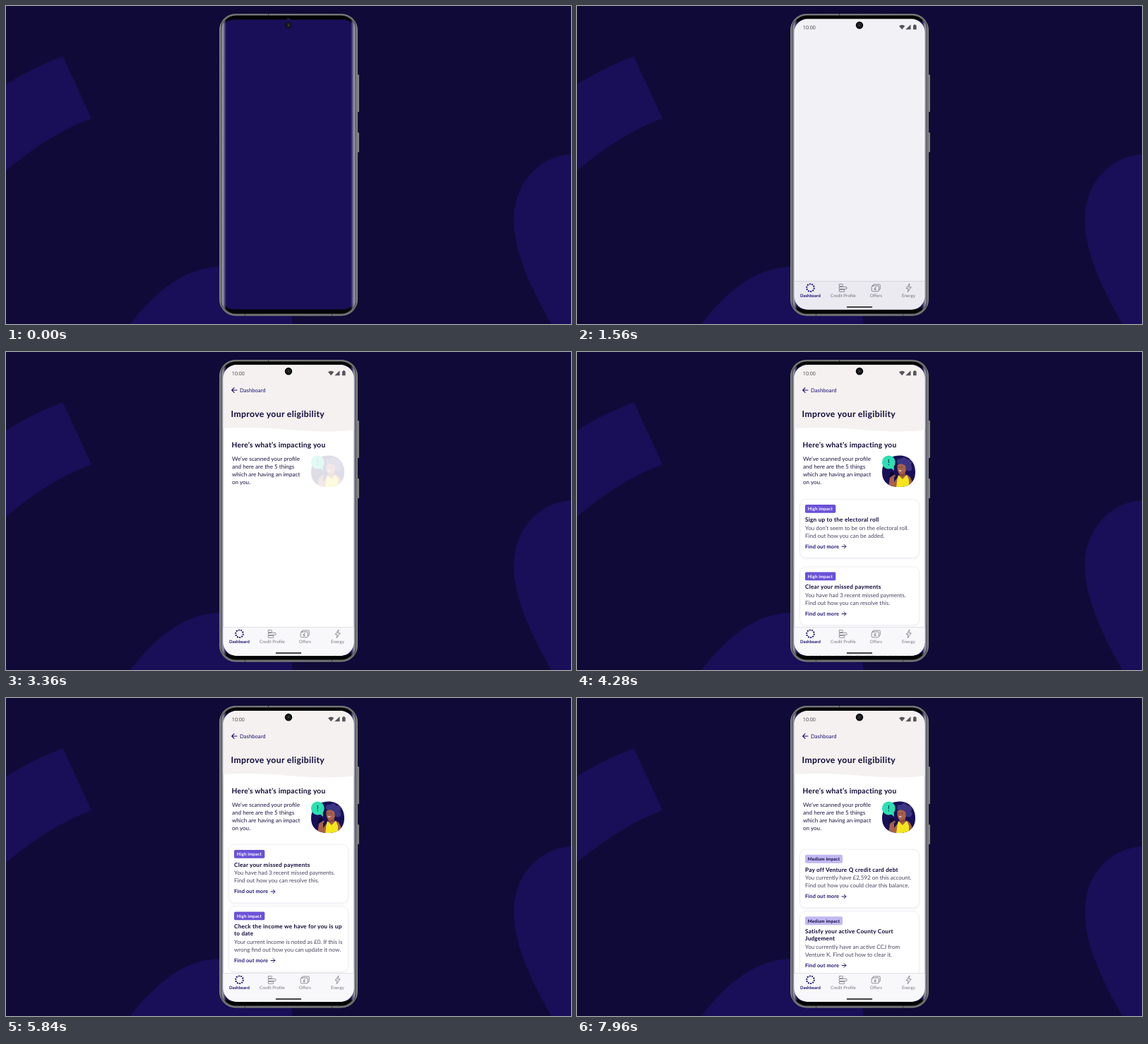
These frames come from a looping animation (800 by 450 pixels, 8 s). An HTML page:

```html
<!DOCTYPE html>
<html lang="en">
<head>
<meta charset="utf-8">
<title>Eligibility cards</title>
<style>
  html, body { margin: 0; width: 100%; height: 100%; overflow: hidden; background: #100a38; }
  svg { display: block; width: 800px; height: 450px; }
  text { font-family: Lato, "Open Sans", sans-serif; text-rendering: geometricPrecision; white-space: pre; }
  .clock { font: 7.3px Roboto, sans-serif; fill: #55555c; }
  .back { font-size: 7.7px; fill: #1c1272; }
  .h1 { font-size: 12.2px; font-weight: 700; letter-spacing: .36px; fill: #0f0938; }
  .h2 { font-size: 10.2px; font-weight: 700; letter-spacing: .25px; fill: #0f0938; }
  .para { font-size: 8.1px; fill: #1c1742; }
  .title { font-size: 8.2px; font-weight: 700; letter-spacing: .23px; fill: #0f0938; }
  .body { font-size: 8.05px; fill: #4a4763; }
  .tag { font-size: 6.3px; font-weight: 700; letter-spacing: .12px; }
  .more { font-size: 7.4px; font-weight: 700; letter-spacing: .15px; fill: #1c1272; }
  .tab { font-size: 6.2px; fill: #77767f; text-anchor: middle; }
  .tab.on { font-size: 6px; font-weight: 700; fill: #1c1272; }
  .line { fill: none; stroke-linecap: round; stroke-linejoin: round; }
  .card { fill: #fff; stroke: #ecebf1; stroke-width: .8; filter: drop-shadow(0 1px 1.5px rgba(20, 12, 70, .07)); }
</style>
</head>
<body>
<svg viewBox="0 0 800 450">
  <defs>
    <linearGradient id="metal" x1="302" x2="498" gradientUnits="userSpaceOnUse">
      <stop offset="0" stop-color="#5c5e5c"/>
      <stop offset=".007" stop-color="#8b8d8b"/>
      <stop offset=".015" stop-color="#434543"/>
      <stop offset=".03" stop-color="#646664"/>
      <stop offset=".5" stop-color="#6c6e6c"/>
      <stop offset=".97" stop-color="#646664"/>
      <stop offset=".985" stop-color="#434543"/>
      <stop offset=".993" stop-color="#8b8d8b"/>
      <stop offset="1" stop-color="#5c5e5c"/>
    </linearGradient>
    <linearGradient id="shine">
      <stop offset="0" stop-color="#4c4d52"/>
      <stop offset=".35" stop-color="#9c9bad"/>
      <stop offset=".6" stop-color="#6d6893" stop-opacity=".75"/>
      <stop offset="1" stop-color="#180f58" stop-opacity="0"/>
    </linearGradient>
    <clipPath id="screen"><rect x="307.5" y="18.2" width="185" height="411.6" rx="19"/></clipPath>
    <clipPath id="glass"><rect x="304.5" y="13.5" width="191" height="422" rx="21"/></clipPath>
    <clipPath id="blob"><path d="M432 170C432 154 443 147 456 146.500C470 146 479 156 479 170C479 184 470 191 456 191C441 191 432 184 432 170Z"/></clipPath>
  </defs>

  <rect width="800" height="450" fill="#100a38"/>
  <g fill="#180f58">
    <path d="M0 111Q40 86 80.500 71L121 159Q60 182 0 233Z"/>
    <path d="M176 450C215 400 255 370 303 369C362 367 403 408 406 450Z"/>
    <path d="M800 210C758 212 719 248 719 302C719 350 745 402 772 450H800Z"/>
  </g>

  <g fill="#7f827f">
    <rect x="497" y="97" width="3" height="53" rx="1"/>
    <rect x="497" y="179" width="3" height="28" rx="1"/>
  </g>
  <rect x="302" y="11" width="196" height="427.500" rx="23" fill="url(#metal)"/>
  <rect x="302.800" y="11.800" width="194.400" height="425.900" rx="22.200" fill="none" stroke="#868986" stroke-width=".8"/>
  <path d="M371.500 11v2.500M338.500 435.500v2.500M461.500 435.500v2.500" stroke="#3b3d3b"/>
  <rect x="305" y="13.500" width="190" height="422" rx="20.500" fill="#030304"/>
  <g clip-path="url(#glass)">
    <rect x="307.500" y="19.300" width="185" height="410" rx="14" fill="#180f58"/>
    <rect x="304" y="20" width="9" height="409" rx="4" fill="url(#shine)"/>
    <rect x="304" y="20" width="9" height="409" rx="4" fill="url(#shine)" transform="matrix(-1 0 0 1 800 0)"/>
  </g>

  <g clip-path="url(#screen)">
    <circle id="badge" cx="400" r="18.500" fill="#fff"/>
    <g id="app">
      <rect x="307" y="18" width="186" height="413" fill="#fff"/>
      <path id="header" d="M307 18H493V110C470 113.500 436 113 402 110S342 106 307 108Z" fill="#f5f1f0"/>
      <text class="clock" x="319.800" y="32.500">10:00</text>
      <g fill="#55555c">
        <path d="M456 28.300Q460.200 25 464.400 28.300L460.200 33.300Z"/>
        <path d="M465.300 33.200L472.500 26.300V33.200Z"/>
        <path d="M476 27.200H477.200V26.300H479.400V27.200H480.600V33.300H476Z"/>
      </g>
      <g id="back">
        <path class="line" d="M327 54H319.800M323 50.700L319.700 54L323 57.300" stroke="#1c1272" stroke-width="1.1"/>
        <text class="back" x="331" y="56.700">Dashboard</text>
      </g>
      <text id="h1" class="h1" x="318.600" y="92.200">Improve your eligibility</text>
      <text id="h2" class="h2" x="319.600" y="135">Here’s what’s impacting you</text>
      <g id="para"></g>
      <g id="art">
        <g clip-path="url(#blob)">
          <rect x="430" y="145" width="50" height="48" fill="#180f58"/>
          <g fill="#3a3482">
            <circle cx="457" cy="155" r="4"/><circle cx="463" cy="153.500" r="4.500"/>
            <circle cx="469" cy="157" r="5"/><circle cx="470" cy="164" r="4.500"/><circle cx="464" cy="159" r="6"/>
          </g>
          <path d="M441 192L443 178L449 177L449 184L456 175L467 174Q475 176 475 192Z" fill="#a86149"/>
          <path d="M452 192L453.500 180L455 174L461 180L467 173.500L470 181V192Z" fill="#f4e51c"/>
          <path d="M456 168H465V174Q461 178 456.500 174.500Z" fill="#8d4c39"/>
        </g>
        <path d="M453.500 160Q459 156 465 161L466 168Q461 174 456 172Q453 168 453.500 160Z" fill="#a86149"/>
        <path d="M455.500 167.500Q457.500 170 460 167.500Z" fill="#fff"/>
        <path d="M455 163h1.500M459.500 163h1.500" stroke="#180f58" stroke-width=".8"/>
        <rect x="442.500" y="169.500" width="5" height="9" rx="1" fill="#0b0730" transform="rotate(14 445 174)"/>
        <path class="line" d="M444 178.500L449.500 175" stroke="#a86149" stroke-width="2.500"/>
        <path d="M443 163L449 168L448.500 160Z" fill="#2ce0b1"/>
        <circle cx="441.300" cy="156" r="9.400" fill="#2ce0b1"/>
        <path class="line" d="M441.300 152.300V156.800" stroke="#180f58"/>
        <circle cx="441.300" cy="159.500" r=".7" fill="#180f58"/>
      </g>
      <g id="cards"></g>
      <g>
        <rect x="307" y="389.500" width="186" height="42" fill="#f8f8fa"/>
        <path d="M307 389.500H493" stroke="#dcdbe1" stroke-width=".8"/>
        <circle cx="330.500" cy="398.700" r="5.300" fill="none" stroke="#1c1272" stroke-width="2" pathLength="100" stroke-dasharray="6 4"/>
        <g class="line" stroke="#77767f" stroke-width=".8">
          <rect x="371.200" y="393.600" width="5.300" height="3" rx=".8"/>
          <rect x="371.200" y="397.500" width="10.800" height="3" rx=".8"/>
          <rect x="371.200" y="401.300" width="7.600" height="3" rx=".8"/>
          <path d="M419.300 396V395Q419.300 394 420.500 394H428Q429.300 394 429.300 395.200V400.500Q429.300 401.700 427.500 401.700"/>
          <rect x="417.200" y="396" width="10.200" height="7.800" rx="1.300"/>
          <path d="M423.200 398.400Q421.800 397.700 421.800 399.300V401.400M421.200 399.900H422.800M421.300 401.500H423.300"/>
          <path d="M470.700 393.300L466 399.700H469L468.300 404.600L473.200 397.800H470.100Z"/>
        </g>
        <text class="tab on" x="330.400" y="412.300">Dashboard</text>
        <text class="tab" x="377" y="412.300">Credit Profile</text>
        <text class="tab" x="423.300" y="412.300">Offers</text>
        <text class="tab" x="469.500" y="412.300">Energy</text>
        <path class="line" d="M382.500 426H417.500" stroke="#0a0a0c" stroke-width="1.500"/>
      </g>
      <circle cx="400" cy="27.300" r="5.200" fill="#08080a"/>
    </g>
  </g>
  <circle cx="400" cy="27.300" r="4.500" fill="#0a090d"/>
  <circle cx="400" cy="27.300" r="3" fill="#141316" stroke="#333036" stroke-width=".7"/>
  <circle cx="400" cy="27.300" r="1" fill="#5b574e"/>
</svg>

<script>
const LOOP = 8000, MID = 248, PITCH = 92.5;
const $ = id => document.getElementById(id);

function add(parent, name, attrs, label) {
  const el = document.createElementNS('http://www.w3.org/2000/svg', name);
  for (const key in attrs) el.setAttribute(key, attrs[key]);
  if (label) el.textContent = label;
  parent.append(el);
  return el;
}

const write = (parent, style, x, y, label, extra) =>
  add(parent, 'text', { class: style, x, y, ...extra }, label);

const content = [
  ['High', ['Sign up to the electoral roll'],
    ['You don’t seem to be on the electoral roll.', 'Find out how you can be added.']],
  ['High', ['Clear your missed payments'],
    ['You have had 3 recent missed payments.', 'Find out how you can resolve this.']],
  ['High', ['Check the income we have for you is up', 'to date'],
    ['Your current income is noted as £0. If this is', 'wrong find out how you can update it now.']],
  ['Medium', ['Pay off Venture Q credit card debt'],
    ['You currently have £2,592 on this account.', 'Find out how you could clear this balance.']],
  ['Medium', ['Satisfy your active County Court', 'Judgement'],
    ['You currently have an active CCJ from', 'Venture K. Find out how to clear it.']]
];

// Each card is drawn with its own top edge at y = 0.
const cards = content.map(([level, title, body]) => {
  const g = add($('cards'), 'g', {});
  const drop = (title.length - 1) * 10;
  const height = 82.5 + drop;
  const high = level === 'High';
  add(g, 'rect', { class: 'card', x: 315.7, y: 0, width: 168.6, height, rx: 8 });
  add(g, 'rect', { x: 323, y: 7.5, width: high ? 43.3 : 53, height: 11.8, rx: 1.8, fill: high ? '#6a51d8' : '#c2b8f2' });
  write(g, 'tag', 326.8, 15.7, level + ' impact', { fill: high ? '#fff' : '#0f0938' });
  title.forEach((s, i) => write(g, 'title', 323, 31.5 + i * 9.8, s));
  body.forEach((s, i) => write(g, 'body', 323, 43 + drop + i * 11, s));
  write(g, 'more', 323, 69 + drop, 'Find out more');
  add(g, 'path', {
    class: 'line', d: 'M375 0h5.800M378.200 -2.700l2.700 2.700l-2.700 2.700',
    transform: `translate(0 ${66.6 + drop})`, stroke: '#1c1272', 'stroke-width': 1
  });
  return { g, height };
});

['We’ve scanned your profile', 'and here are the 5 things', 'which are having an impact', 'on you.']
  .forEach((s, i) => write($('para'), 'para', 320, 154.3 + i * 10.8, s));

const part = (t, start, length) => Math.min(1, Math.max(0, (t - start) / length));
const cubicOut = p => 1 - (1 - p) ** 3;
const expoOut = p => p <= 0 ? 0 : p >= 1 ? 1 : 1 - 2 ** (-10 * p);
const move = (el, x, y) => el.setAttribute('transform', `translate(${x.toFixed(3)} ${y.toFixed(3)})`);
const fade = (el, p) => el.setAttribute('opacity', p.toFixed(4));

// id, start, length, rise
const reveals = [['back', 2040, 320, 10], ['h1', 2360, 320, 10], ['h2', 2680, 320, 10], ['para', 2880, 320, 0]];

function draw(t) {
  $('badge').setAttribute('cy', -1 + 227.5 * cubicOut(part(t, 0, 880)));
  fade($('badge'), 1 - part(t, 1240, 200));
  fade($('app'), cubicOut(part(t, 1240, 520)));
  fade($('header'), part(t, 1560, 200));
  for (const [id, start, length, rise] of reveals) {
    const p = cubicOut(part(t, start, length));
    fade($(id), p);
    move($(id), 0, rise * (1 - p));
  }
  fade($('art'), part(t, 3320, 200) ** 1.25);

  let scroll = 0;
  for (let k = 0; k < 3; k++) scroll += PITCH * expoOut(part(t, 5280 + 1200 * k, 780));
  cards.forEach(({ g, height }, i) => {
    const enter = 185 * (1 - expoOut(part(t, 3800 + 100 * i, 720)));
    const leave = -178 * part(t, 4800 + 1200 * i, 200) ** 3;
    move(g, leave, MID - height / 2 + PITCH * i - scroll + enter);
  });
}

const begin = performance.now();
function tick() {
  draw((performance.now() - begin) % LOOP);
  requestAnimationFrame(tick);
}
draw(0);
requestAnimationFrame(tick);
</script>
</body>
</html>
```
